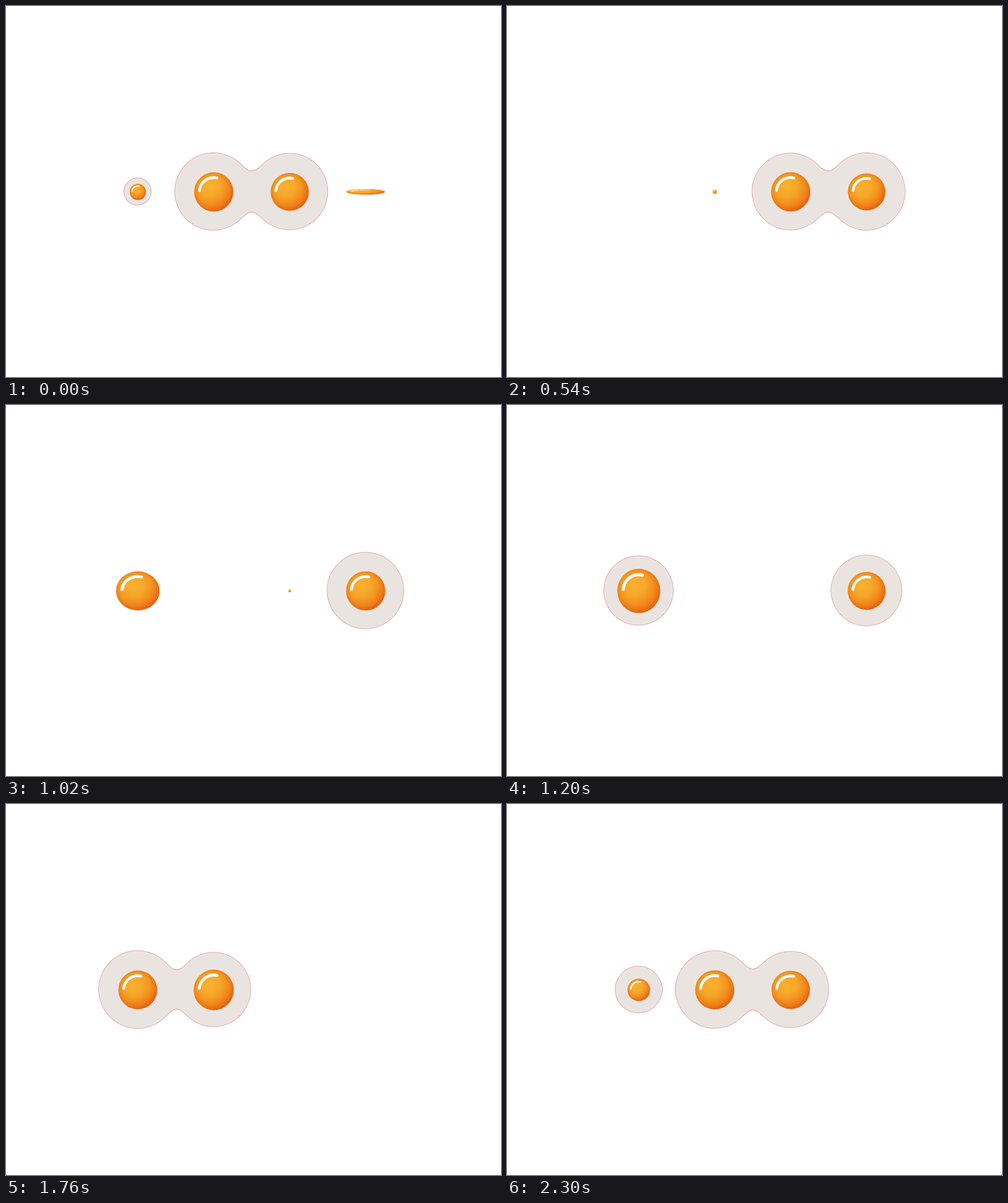
Recreate the animation shown at these times as an HTML page. Size 800 by 600 pixels, loop 2320 ms.

```html
<!DOCTYPE html>
<html lang="en">
<head>
<meta charset="utf-8">
<title>Eggs</title>
<style>
  html, body { margin: 0; width: 100%; height: 100%; overflow: hidden; background: #fff; }
  svg { display: block; width: 100%; height: 100%; }
</style>
</head>
<body>
<svg viewBox="0 0 800 600">
  <defs>
    <filter id="goo" filterUnits="userSpaceOnUse" x="100" y="180" width="600" height="240" color-interpolation-filters="sRGB">
      <feGaussianBlur in="SourceAlpha" stdDeviation="12" result="blur"/>
      <!-- two thresholds: thin rim below, egg white above -->
      <feColorMatrix in="blur" result="rim" values="0 0 0 0 .88  0 0 0 0 .58  0 0 0 0 .61  0 0 0 30 -12.85"/>
      <feColorMatrix in="blur" result="body" values="0 0 0 0 .916  0 0 0 0 .896  0 0 0 0 .884  0 0 0 30 -13.6"/>
      <feMerge><feMergeNode in="rim"/><feMergeNode in="body"/></feMerge>
    </filter>
    <radialGradient id="fill" gradientUnits="userSpaceOnUse" cx="-6" cy="-8" r="41.5">
      <stop offset="0" stop-color="#f8b12f"/>
      <stop offset=".36" stop-color="#f6a82a"/>
      <stop offset=".62" stop-color="#f29320"/>
      <stop offset=".82" stop-color="#ee7b17"/>
      <stop offset="1" stop-color="#e8590c"/>
    </radialGradient>
    <radialGradient id="edge" gradientUnits="userSpaceOnUse" cx="0" cy="0" r="31.4">
      <stop offset=".8" stop-color="#e8640e" stop-opacity="0"/>
      <stop offset="1" stop-color="#e8640e" stop-opacity=".35"/>
    </radialGradient>
    <g id="yolk">
      <circle r="31.4" fill="url(#fill)"/>
      <circle r="31.4" fill="url(#edge)"/>
      <path d="M-22.8-2.2A22.9 22.9 0 0 1 5.2-22.3" fill="none" stroke="#fff" stroke-width="4.4" stroke-linecap="round"/>
    </g>
  </defs>
  <g id="whites" filter="url(#goo)"></g>
  <g id="yolks"></g>
</svg>
<script>
const LOOP = 2320, STEP = 20;
const FIRST = 940, STAGGER = 460; // birth of the first egg, delay to the next
const SHRINK = 1370;              // age at which a yolk is half gone
const WHITE_LAG = 5, R_WHITE = 63;

// u: age of an egg, v: time relative to the middle of its shrinking
function whiteRadius(u, v) {
  const grow = 1 - 2 ** ((WHITE_LAG - u) / 80);
  const fade = 1 - 2 ** ((v - 104) / 80) - 2 ** ((v - 25) / 6);
  return R_WHITE * Math.max(0, Math.min(grow, fade));
}

function expoInOut(v) {
  const half = 0.5 * 2 ** (-Math.abs(v) / 40);
  return v < 0 ? 1 - half : half;
}

// damped swing around full size
const swing = (u, amp) => 1 + amp * 2 ** (-u / 200) * Math.sin(Math.PI * u / 415);

// the yolk appears flat at full width, then swells upward
function yolkScale(u, v) {
  const size = expoInOut(v);
  const rise = 1 - 0.86 * 2 ** (-u / 30);
  return [size * swing(u, 0.28), size * swing(u, 0.38) * rise];
}

function add(parent, name, attrs) {
  const el = document.createElementNS(parent.namespaceURI, name);
  for (const key in attrs) el.setAttribute(key, attrs[key]);
  return parent.appendChild(el);
}

const whites = document.getElementById("whites");
const yolks = document.getElementById("yolks");
const eggs = [0, 1, 2, 3].map(i => {
  const x = 212.6 + 122.75 * i;
  return {
    x,
    birth: FIRST + STAGGER * i,
    white: add(whites, "circle", { cx: x, cy: 300, r: 0 }),
    yolk: add(yolks, "use", { href: "#yolk" })
  };
});

function draw(time) {
  const t = Math.floor(time % LOOP / STEP) * STEP;
  for (const { x, birth, white, yolk } of eggs) {
    const u = (t - birth + LOOP) % LOOP;
    const v = u - SHRINK;
    white.setAttribute("r", whiteRadius(u, v));
    yolk.setAttribute("transform", `translate(${x + 0.4} 300.6) scale(${yolkScale(u, v)})`);
  }
}

const start = performance.now();
function tick() {
  draw(performance.now() - start);
  requestAnimationFrame(tick);
}
tick();
</script>
</body>
</html>
```
